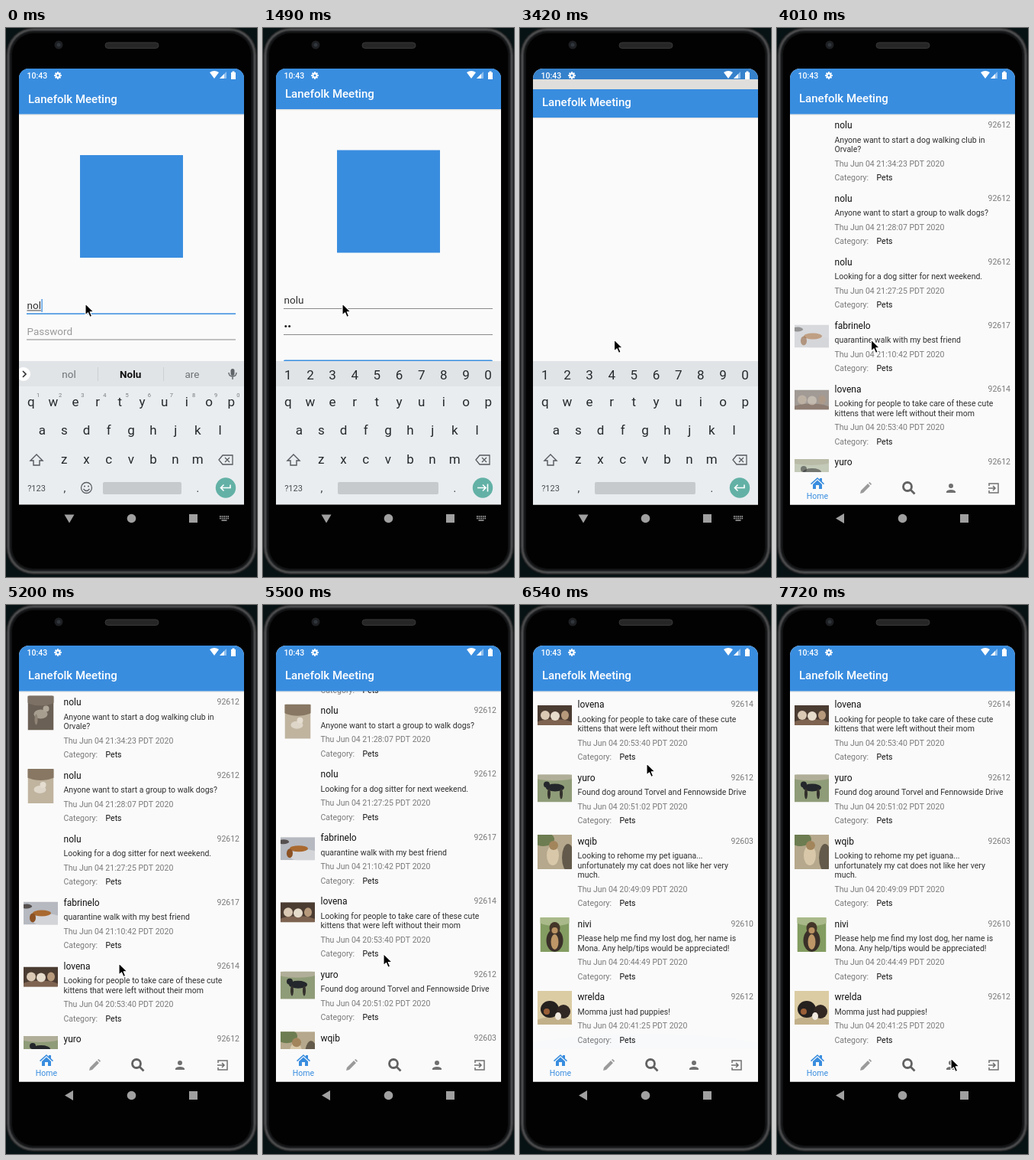
Recreate the animation shown at these times as an HTML page with a canvas. Size 329 by 717 pixels, loop 8 s.

```html
<!DOCTYPE html>
<html lang="en">
<head>
<meta charset="utf-8">
<title>Neighbourhood app</title>
<style>
html, body { margin: 0; width: 100%; height: 100%; overflow: hidden; background: #000; }
canvas { display: block; width: 329px; height: 717px; }
</style>
</head>
<body>
<canvas id="stage"></canvas>
<script>
const W = 329, H = 717, LOOP = 8000;
const BLUE = '#398ddf', PAPER = '#fafafa', TEAL = '#63b1a6';
const APP = 'Lanefolk Meeting', USER = 'nolu';
const BAR_END = 112.5, SCREEN_END = 622.5;

const canvas = document.getElementById('stage');
const ctx = canvas.getContext('2d');
const dpr = window.devicePixelRatio || 1;
canvas.width = W * dpr;
canvas.height = H * dpr;

// Screen updates arrive in bursts: [first, last, count]
const BURSTS = [
  [0, 0, 1], [150, 150, 1], [440, 890, 4], [1340, 2370, 8], [2520, 2520, 1],
  [3270, 4310, 8], [4610, 5650, 8], [5800, 6830, 8], [6980, 7720, 6]
];
const TICKS = BURSTS.flatMap(([a, b, n]) =>
  Array.from({ length: n }, (_, i) => n < 2 ? a : Math.round((a + (b - a) * i / (n - 1)) / 10) * 10));

// Pointer path: time, x, y
const POINTER = [
  [0, 104, 360], [1790, 104, 360], [2370, 123.5, 407], [4460, 123.5, 407],
  [5200, 148, 468], [5350, 154, 580], [5800, 166, 207], [6680, 166, 207],
  [6830, 170, 222], [7570, 228, 592]
];

// Photos: width, height, ground, then blobs of colour, x, y, rx, ry
const pale = [34, 45, '#6b6055', ['#7d7165', 17, 5, 20, 8], ['#a89e90', 17, 24, 9, 6], ['#b0a698', 24, 17, 4, 4], ['#8f8476', 11, 31, 2, 7]];
const rug = [34, 45, '#c0b49f', ['#877763', 17, 6, 22, 9], ['#ded6c8', 16, 27, 8, 5], ['#e4ddd0', 20, 21, 4, 4]];
const snow = [45, 30, '#b6b9c0', ['#d3d4d8', 32, 24, 20, 8], ['#55504f', 4, 6, 7, 3], ['#a9692f', 24, 15, 12, 4], ['#8c5224', 12, 21, 4, 6]];
const kittens = [45, 26, '#4b3c32', ['#7d6350', 22, 24, 24, 6], ['#d9c9b4', 10, 13, 6, 6], ['#e6dccb', 23, 14, 6, 6], ['#b79a7c', 36, 13, 5, 6]];
const lawn = [45, 36, '#8f9c78', ['#b0ae98', 22, 3, 26, 5], ['#24272b', 23, 17, 12, 5], ['#24272b', 12, 13, 4, 4], ['#33302c', 15, 25, 2, 7], ['#33302c', 31, 25, 2, 7]];
const porch = [45, 45, '#b5a88c', ['#6d7d51', 8, 6, 14, 9], ['#635a4b', 40, 30, 8, 18], ['#d8c8a9', 20, 27, 8, 13], ['#a3855c', 21, 14, 6, 6]];
const shepherd = [38, 45, '#839c61', ['#a9b989', 19, 4, 22, 7], ['#3a3029', 19, 30, 11, 15], ['#bd9767', 19, 32, 5, 10], ['#443629', 19, 14, 7, 8], ['#b99263', 19, 17, 4, 4]];
const puppies = [45, 44, '#dccca4', ['#c2b08a', 22, 42, 26, 8], ['#25211f', 16, 24, 12, 11], ['#312824', 34, 27, 9, 9], ['#9a5f37', 12, 27, 4, 4], ['#efe9de', 27, 33, 4, 5]];

const POSTS = [
  [USER, '92612', ['Anyone want to start a dog walking club in', 'Orvale?'], '21:34:23', pale],
  [USER, '92612', ['Anyone want to start a group to walk dogs?'], '21:28:07', rug],
  [USER, '92612', ['Looking for a dog sitter for next weekend.'], '21:27:25', null],
  ['fabrinelo', '92617', ['quarantine walk with my best friend'], '21:10:42', snow],
  ['lovena', '92614', ['Looking for people to take care of these cute', 'kittens that were left without their mom'], '20:53:40', kittens],
  ['yuro', '92612', ['Found dog around Torvel and Fennowside Drive'], '20:51:02', lawn],
  ['wqib', '92603', ['Looking to rehome my pet iguana...', 'unfortunately my cat does not like her very', 'much.'], '20:49:09', porch],
  ['nivi', '92610', ['Please help me find my lost dog, her name is', 'Mona. Any help/tips would be appreciated!'], '20:44:49', shepherd],
  ['wrelda', '92612', ['Momma just had puppies!'], '20:41:25', puppies]
];
const MAX_SCROLL = 341.5;

const clamp = (v, a = 0, b = 1) => Math.min(b, Math.max(a, v));

function rect(x, y, w, h, fill) {
  ctx.fillStyle = fill;
  ctx.fillRect(x, y, w, h);
}
function round(x, y, w, h, r, fill) {
  ctx.beginPath();
  ctx.roundRect(x, y, w, h, r);
  if (!fill) return;
  ctx.fillStyle = fill;
  ctx.fill();
}
function dot(x, y, rx, fill, ry = rx) {
  ctx.beginPath();
  ctx.ellipse(x, y, rx, ry, 0, 0, 7);
  ctx.fillStyle = fill;
  ctx.fill();
}
function text(s, x, y, size, fill, { align = 'left', weight = 400 } = {}) {
  ctx.font = `${weight} ${size}px Roboto, sans-serif`;
  ctx.textAlign = align;
  ctx.fillStyle = fill;
  ctx.fillText(s, x, y + size * 0.36);
  return ctx.measureText(s).width;
}
const mid = (s, x, y, size, fill, weight) => text(s, x, y, size, fill, { align: 'center', weight });

// Icon from SVG path data, placed around x, y
function icon(d, x, y, fill, stroke, width = 1.5) {
  const p = new Path2D(d);
  ctx.save();
  ctx.translate(x, y);
  if (fill) { ctx.fillStyle = fill; ctx.fill(p, 'evenodd'); }
  if (stroke) { ctx.strokeStyle = stroke; ctx.lineWidth = width; ctx.stroke(p); }
  ctx.restore();
}
function clipped(x, y, w, h, draw) {
  ctx.save();
  ctx.beginPath();
  ctx.rect(x, y, w, h);
  ctx.clip();
  draw();
  ctx.restore();
}

function pointer(t) {
  const i = POINTER.findIndex(p => p[0] > t);
  if (i < 0) return POINTER[POINTER.length - 1].slice(1);
  const [ta, xa, ya] = POINTER[i - 1], [tb, xb, yb] = POINTER[i];
  const k = (t - ta) / (tb - ta);
  return [xa + (xb - xa) * k, ya + (yb - ya) * k];
}

function phone() {
  rect(0, 0, W, H, '#071214');
  // Metal rim: rings that brighten, then fade into the black glass
  for (let i = 0; i < 8; i++) {
    const v = Math.round(16 + 62 * Math.exp(-(((i - 2.5) / 2) ** 2)));
    round(i, i - 1, W - 2 * i, 715 - 2 * i, 36 - i, `rgb(${v},${v + 1},${v + 2})`);
  }
  round(8, 7, W - 16, 699, 28, '#020202');
  dot(69, 22, 5.5, '#1d1f22');
  dot(69, 22, 2.5, '#30363c');
  round(130, 19, 70, 7.5, 4, '#262626');
  ctx.strokeStyle = '#383838';
  ctx.lineWidth = 1;
  ctx.stroke();
}

function statusIcons() {
  text('10:43', 27.5, 62, 10.5, '#fff', { weight: 500 });
  for (let i = 0; i < 4; i++) {
    ctx.save();
    ctx.translate(68, 62);
    ctx.rotate(i * Math.PI / 4);
    rect(-1, -4.8, 2, 9.6, '#fff');
    ctx.restore();
  }
  dot(68, 62, 3.6, '#fff');
  dot(68, 62, 1.5, BLUE);
  icon('M-6-3Q0-7 6-3L0 5Z', 273, 61, '#fff');
  icon('M4-5V4H-5Z', 285, 62, '#8fbfee');
  icon('M1-2V4H-5Z', 285, 62, '#fff');
  rect(295, 58, 6, 9, '#fff');
  rect(296.5, 56.5, 3, 2, '#fff');
}

function appBar(top, bottom, titleY) {
  rect(17, bottom, 295, 1.5, 'rgba(0,0,0,0.08)');
  rect(17, top, 295, bottom - top, BLUE);
  text(APP, 29, titleY, 15, '#fff', { weight: 500 });
}

function field(y, focused) {
  rect(27, y, 274, focused ? 1.5 : 1, focused ? BLUE : '#8a8a8a');
}

function login(t) {
  const pan = t < 1490 ? 0 : t < 1640 ? 6.5 : t < 1790 ? 29.5 : 36.5;
  rect(17, 53, 295, 400, PAPER);
  rect(97, 166 - pan, 135, 134, BLUE);

  const typed = t < 150 ? USER.slice(0, 3) : USER;
  const inName = t < 440, inPass = t >= 440 && t < 1340;
  const w = text(typed, 27.5, 362 - pan, 13.5, '#303030');
  field(372.5 - pan, inName);
  if (inName) {
    rect(27.5, 368.5, w, 1, '#444');
    rect(28 + w, 354, 1.3, 17, BLUE);
  }
  const count = t < 740 ? 0 : t < 890 ? 1 : 2;
  if (!count) text('Password', 27.5, 396, 13.5, '#9a9a9a');
  for (let i = 0; i < count; i++) dot(29.8 + i * 4.8, 396 - pan, 1.5, '#222');
  if (inPass) rect(28 + count * 5, 388, 1.3, 17, BLUE);
  field(406.5 - pan, inPass);

  round(27, 441 - pan, 274, 28, 1.5, 'rgba(0,0,0,0.12)');
  round(27, 440 - pan, 274, 28, 1.5, t >= 1640 && t < 2520 ? '#3686d5' : BLUE);
  mid('Login', 164, 454.5 - pan, 13.7, '#fff');

  appBar(53, BAR_END - pan, 92.5 - pan);
  rect(17, 53, 295, 18, BLUE);
}

function keyRow(chars, x, y) {
  [...chars].forEach((c, i) => mid(c, x + i * 29.15, y, 17, '#26292c'));
}

function keyboard(t, dy) {
  ctx.save();
  ctx.translate(0, dy);
  rect(17, 435, 295, 188, '#e9edf0');
  rect(17, 435, 295, 33, '#e1e4e7');
  const words = t < 440;
  if (words) {
    const tips = t < 150 ? ['nol', 'Nolu', 'are'] : [USER, 'Nolu', 'Nolus'];
    tips.forEach((s, i) => mid(s, 82.5 + i * 80.7, 452.5, 13.5, i === 1 ? '#111' : '#6d7175', i === 1 ? 700 : 400));
    rect(120, 443, 1, 18, '#cdd0d3');
    rect(206, 443, 1, 18, '#cdd0d3');
    clipped(17, 435, 30, 33, () => dot(23, 452, 9, '#fff'));
    icon('M-2-4L2 0L-2 4', 24, 452, null, '#333', 1.7);
    round(294.5, 445, 5, 9, 2.5, '#60656a');
    icon('M-5-1Q-5 4 0 4Q5 4 5-1M0 4V8', 297, 451, null, '#60656a', 1.4);
    [...'1234567890'].forEach((c, i) => mid(c, 42 + i * 29.15, 479, 7.5, '#777b7f'));
  } else {
    keyRow('1234567890', 32.8, 453);
  }
  keyRow('qwertyuiop', 32.8, 487.5);
  keyRow('asdfghjkl', 47.3, 525);
  keyRow('zxcvbnm', 76.3, 563);
  icon('M0-7L8 1H4V7H-4V1H-8Z', 40, 564, null, '#565a5e', 1.4);
  icon('M-9 0L-4-6H9V6H-4ZM-1-3L5 3M5-3L-1 3', 288, 564, null, '#565a5e', 1.3);
  mid('?123', 40, 601, 11, '#4a4e52');
  mid(',', 76.8, 601, 14, '#333');
  mid('.', 251.3, 601, 14, '#333');
  if (words) {
    icon('M7 0A7 7 0 1 1-7 0A7 7 0 1 1 7 0M-4 1.5Q0 6.5 4 1.5', 105.5, 600.5, null, '#5b5f63', 1.3);
    dot(103, 598.5, 1, '#5b5f63');
    dot(108, 598.5, 1, '#5b5f63');
  }
  const left = words ? 127 : 98;
  round(left, 593, 230 - left, 16, 2, '#c7cacc');
  dot(288, 600.5, 13.2, TEAL);
  const tab = t >= 440 && t < 1640;
  icon(tab ? 'M-7 0H4M0-4L4 0L0 4M6.5-5V5' : 'M6-4V0H-6M-2.5-4L-6.5 0L-2.5 4', 288, 600.5, null, '#fff', 1.6);
  ctx.restore();
}

function photo([w, h, ground, ...blobs], y, alpha) {
  const x = 45.5 - w / 2, top = y - h / 2;
  ctx.globalAlpha = alpha;
  clipped(x, top, w, h, () => {
    rect(x, top, w, h, ground);
    for (const [c, bx, by, rx, ry] of blobs) dot(x + bx, top + by, rx, c, ry);
  });
  ctx.globalAlpha = 1;
}

function feed(t, scroll) {
  let top = 112 - scroll;
  POSTS.forEach(([name, zip, lines, time, pic], i) => {
    const last = top + 34 + (lines.length - 1) * 12.5;
    if (pic) photo(pic, top + 29, clamp((t - (i < 2 ? 4300 : 3860)) / (i < 2 ? 700 : 300)));
    text(name, 75.5, top + 15, 12, '#111');
    text(zip, 306, top + 14.5, 10.5, '#7a7a7a', { align: 'right' });
    lines.forEach((s, n) => text(s, 75.5, top + 34 + n * 12.5, 10.5, '#303030'));
    text(`Thu Jun 04 ${time} PDT 2020`, 75.5, last + 18.5, 10.5, '#7a7a7a');
    text('Category:', 75.5, last + 37, 10.5, '#7a7a7a');
    text('Pets', 130.5, last + 37, 10.5, '#111');
    top += 83 + (lines.length - 1) * 12.5;
  });
}

function tabs() {
  rect(17, 580, 295, 43, PAPER);
  icon('M-9 0L0-8L3-5.3V-7H6V-2.7L9 0L8 1.2L0-6L-8 1.2ZM-6 1L0-4.4L6 1V7H2V2H-2V7H-6Z', 53, 595, BLUE);
  mid('Home', 53, 611, 10.5, BLUE);
  icon('M-7 7L-6 3L3-6L6-3L-3 6ZM4-7L5.5-8L8-5.5L7-4Z', 116, 601, '#9a9a9a');
  icon('M4.5-2A5.5 5.5 0 1 1-6.5-2A5.5 5.5 0 1 1 4.5-2M3 2L8.5 7.5', 172, 601, null, '#626262', 2.8);
  dot(228, 598, 3, '#707070');
  icon('M-6 6V4.5Q-5 2 0 2Q5 2 6 4.5V6Z', 228, 601, '#707070');
  icon('M-6-3V-6H6V6H-6V3M-7 0H2M-1-3L2 0L-1 3', 284, 601, null, '#707070', 1.5);
}

function home(t, py) {
  rect(17, 53, 295, 570, PAPER);
  const scroll = t < 5350 ? 0 : t <= 5800 ? clamp(540 - py, 0, MAX_SCROLL) : MAX_SCROLL;
  clipped(17, 112, 295, 468, () => {
    if (t >= 3720) feed(t, scroll);
    const glow = t > 5800 ? 0.13 * clamp((6600 - t) / 650) : 0;
    if (glow) dot(164, 592, 190, `rgba(57,141,223,${glow})`, 32);
  });
  if (t >= 3570) tabs();
  if (t === 3420) {
    rect(17, 53, 295, 14, '#3581cb');
    rect(17, 67, 295, 13, '#e0dedc');
    appBar(80, 117, 97);
  } else {
    const drop = t < 3420 ? 12 : 0;
    appBar(53 + drop, BAR_END + drop, 92 + drop);
  }
}

function navBar(t) {
  const grey = '#a0a0a0';
  const typing = t < 3720;
  icon(typing ? 'M-6.5-5H6.5L0 6Z' : 'M5-6.5V6.5L-6 0Z', 83, 640.5, grey);
  dot(164.5, 640.5, 5.8, grey);
  rect(240, 635, 11, 11, grey);
  if (!typing) return;
  for (let i = 0; i < 10; i++) rect(280 + i % 5 * 2.6, 637 + (i > 4) * 2.6, 1.7, 1.7, grey);
  rect(282.5, 642.3, 7, 1.5, grey);
}

function draw(t) {
  const [px, py] = pointer(t);
  ctx.setTransform(dpr, 0, 0, dpr, 0, 0);
  phone();

  ctx.save();
  round(17, 53, 295, SCREEN_END - 53, [13, 13, 0, 0]);
  ctx.clip();
  if (t < 3420) login(t);
  if (t >= 3270) {
    ctx.globalAlpha = t < 3420 ? 0.3 : 1;
    home(t, py);
    ctx.globalAlpha = 1;
  }
  const slide = clamp((t - 3420) / 300) * 188;
  if (slide < 188) keyboard(t, slide);
  statusIcons();
  ctx.restore();

  navBar(t);
  ctx.lineJoin = 'round';
  icon('M0 0V15L3.5 11.8L6 17.5L8.6 16.3L6.2 10.8H11Z', px, py, '#000', '#fff', 1.1);
  ctx.lineJoin = 'miter';
}

function loop(now) {
  const t = now % LOOP;
  draw(TICKS.filter(k => k <= t).pop() || 0);
  requestAnimationFrame(loop);
}
requestAnimationFrame(loop);
</script>
</body>
</html>
```
